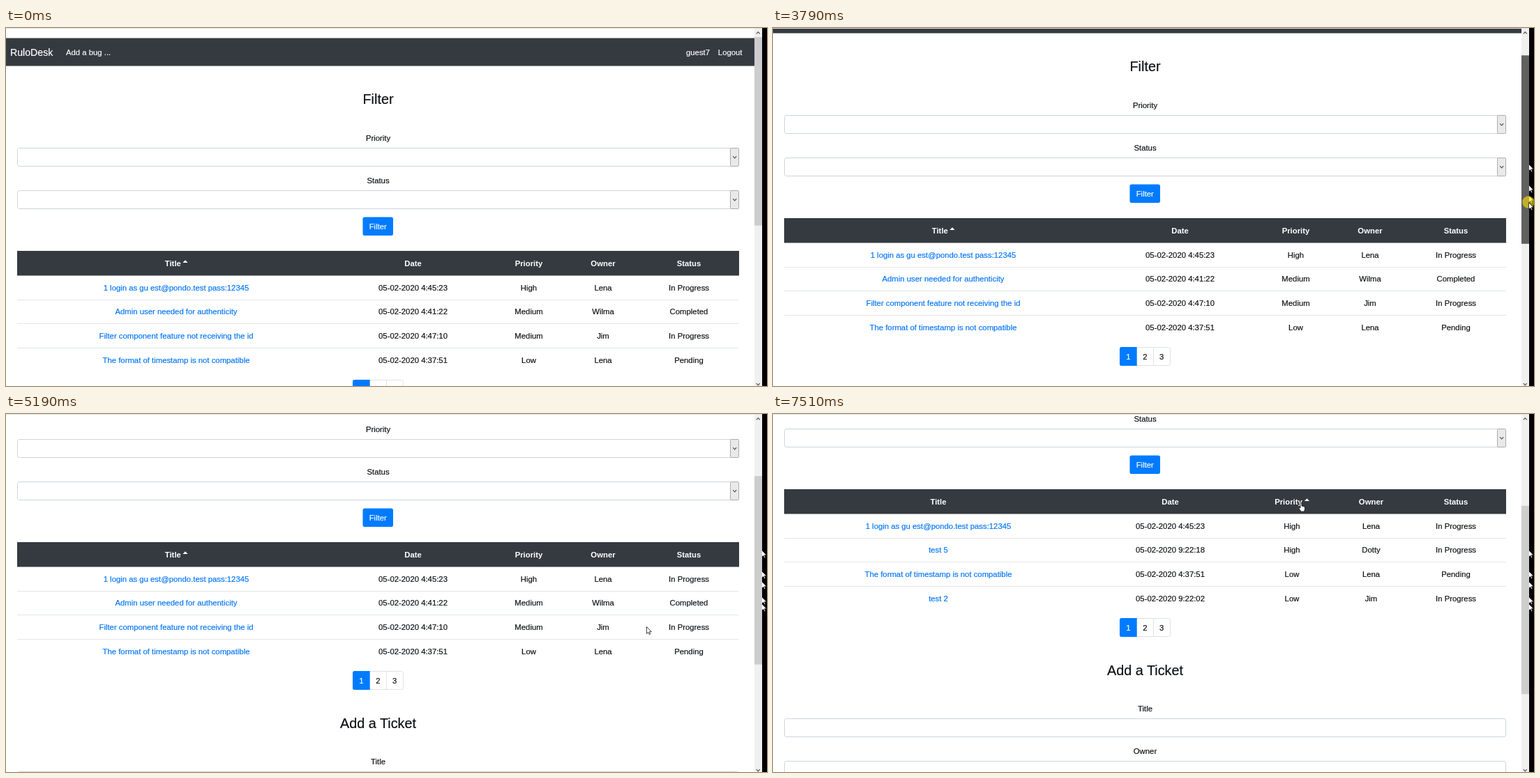
Recreate the animation shown at these times as an HTML page. Size 1091x514 px, loop 8000 ms.

```html
<!DOCTYPE html>
<html lang="en">
<head>
<meta charset="utf-8">
<title>Bug list</title>
<style>
  html, body { margin: 0; width: 100%; height: 100%; overflow: hidden; background: #fff; }
  svg { display: block; font: 11.34px "Liberation Sans", Arial, sans-serif; }
  text { color: #0d1013; fill: currentColor; stroke: currentColor; stroke-width: .18; }
  .mid { text-anchor: middle; }
  .end { text-anchor: end; }
  .big { font-size: 19.84px; }
  .brand { font-size: 14.17px; }
  .bold { font-weight: bold; stroke: none; }
  .white { color: #fff; }
  .link { color: #0074f5; }
  .chevron { fill: none; stroke: #505050; stroke-width: 1.2; }
  .pointer { fill: #fff; stroke: #111; stroke-width: .8; }
</style>
</head>
<body>
<svg id="stage" width="1091" height="514" viewBox="0 0 1091 514"></svg>
<script>
const LOOP = 8000, PRESS = 3590, RELEASE = 4420, LEAVE = 5140, CLICK = 7000, SORT = 7220;
const ARROW = 'M.4.4V10.4L2.7 8.3 4.2 11.6 5.7 11 4.3 7.7H7.4Z';
const HAND = 'M-1 8V1.3Q0-.4 1 1.3V5L4.6 6Q6 6.5 5.6 9L4.6 13H0L-3 8.6Q-2.6 6.8-1 8Z';

const rect = (x, y, w, h, fill, extra = '') =>
  `<rect x="${x}" y="${y}" width="${w}" height="${h}" fill="${fill}" ${extra}/>`;
const text = (x, y, str, cls = 'mid') => `<text x="${x}" y="${y}" class="${cls}">${str}</text>`;
const chevron = (x, y, d = 1) =>
  `<path class="chevron" d="M${x - 2.5} ${y - d * 1.3}l2.5 ${d * 2.6} 2.5 ${-d * 2.6}"/>`;
const field = y => rect(16.5, y + .5, 1034, 26, '#fff', 'rx="2.8" stroke="#ced4da"');
const select = y => field(y) +
  rect(1038.5, y + .5, 12, 26, '#e9e9e9', 'rx="1" stroke="#adadad"') + chevron(1044.7, y + 13.5);

function table(id, cols, sorted, caretX, headX, rows) {
  const heads = ['Title', 'Date', 'Priority', 'Owner', 'Status'];
  let out = rect(16, 320, 1035, 35.5, '#343a40');
  heads.forEach((h, i) => out += text(i === sorted ? headX : cols[i], 341.5, h, 'mid bold white'));
  out += `<path fill="#fff" d="M${caretX - 3.6} 337l3.6-3.7 3.6 3.7z"/>`;
  rows.forEach((row, r) => {
    const y = 376.5 + r * 34.7;
    if (r) out += rect(16, Math.round(y - 21.7), 1035, 1, '#e3e6ea');
    row.split('|').forEach((cell, i) => out += text(cols[i], y, cell, i ? 'mid' : 'mid link'));
  });
  return `<g id="${id}">${out}</g>`;
}

const login = '1 login as gu est@pondo.test pass:12345|05-02-2020 4:45:23|High|Lena|In Progress';
const stamp = 'The format of timestamp is not compatible|05-02-2020 4:37:51|Low|Lena|Pending';
const byTitle = table('byTitle', [244, 583.5, 749.5, 856, 979], 0, 257, 239.3, [
  login,
  'Admin user needed for authenticity|05-02-2020 4:41:22|Medium|Wilma|Completed',
  'Filter component feature not receiving the id|05-02-2020 4:47:10|Medium|Jim|In Progress',
  stamp
]);
const byPriority = table('byPriority', [237, 569.5, 744, 857.5, 979], 2, 765.5, 739, [
  login,
  'test 5|05-02-2020 9:22:18|High|Dotty|In Progress',
  stamp,
  'test 2|05-02-2020 9:22:02|Low|Jim|In Progress'
]);

const pager = rect(497.5, 505.5, 72, 26, '#fff', 'rx="2.8" stroke="#dee2e6"') +
  rect(545, 505.5, 1, 26, '#dee2e6') +
  '<path fill="#007bff" d="M521.7 505V532H499.8Q497 532 497 529.2V507.8Q497 505 499.8 505Z"/>' +
  [1, 2, 3].map(n => text(485.5 + n * 23.9, 522.5, n, n === 1 ? 'mid white' : 'mid')).join('');

const page = rect(0, 14.5, 1073, 40, '#343a40') +
  text(6, 39.7, 'RuloDesk', 'brand white') + text(86, 38.7, 'Add a bug ...', 'white') +
  text(1009, 38.7, 'guest7', 'end white') + text(1055.5, 38.7, 'Logout', 'end white') +
  text(533.5, 109, 'Filter', 'mid big') +
  text(533.5, 162, 'Priority') + select(172) +
  text(533.5, 223, 'Status') + select(233) +
  rect(511.5, 271.5, 43.5, 26.5, '#007bff', 'rx="2.8"') + text(533.3, 289.2, 'Filter', 'mid white') +
  byTitle + byPriority + pager +
  text(533.5, 586.5, 'Add a Ticket', 'mid big') +
  text(533.5, 639, 'Title') + field(649) +
  text(533.5, 700, 'Owner') + field(710);

const trail = [195, 225, 240, 262, 272];
const stage = document.getElementById('stage');
stage.innerHTML = rect(0, 0, 1091, 514, '#fff') +
  `<g id="page">${page}</g>` +
  rect(0, 0, 1084, 1, '#e2e2e2') + rect(1073, 1, 11, 513, '#f0f0f0') +
  chevron(1078.3, 7, -1) + chevron(1078.3, 511.5) +
  rect(1073, 13, 11, 270.5, '#cdcdcd', 'id="thumb"') + rect(1084, 0, 7, 514, '#000') +
  '<clipPath id="edge"><rect x="1084" y="0" width="7" height="514"/></clipPath>' +
  '<g clip-path="url(#edge)">' +
  trail.map(y => `<path class="pointer trail" d="${ARROW}" transform="translate(1083 ${y})"/>`).join('') + '</g>' +
  '<circle id="press" r="8.7" fill="#ffe600" fill-opacity=".6"/><path id="cursor" class="pointer"/>';

// Each move: start, end, number of steps, points to pass after the previous end
const cursorMoves = [
  [180, 181, 1, [[800, 391]]],
  [260, 261, 1, [[764, 369]]],
  [970, 1110, 3, [[721, 289]]],
  [1420, 1510, 2, [[719, 281]]],
  [1690, 2280, 9, [[586, 246], [690, 226], [880, 289]]],
  [2730, 3530, 11, [[1000, 225], [1083, 195], [1083, 197]]],
  [PRESS, 4310, 10, [[1083, 250], [1083, 272]]],
  [LEAVE, 5430, 5, [[624, 365]]],
  [6130, 6910, 11, [[583, 310], [874, 140], [800, 107], [757, 127]]]
];
const scrollMoves = [
  [PRESS, 4310, 10, [[79], [130]]],
  [RELEASE, 4720, 1, [[136]]],
  [5360, 5580, 4, [[171], [212]]]
];
const linear = u => u;
const easeOut = u => 1 - (1 - u) ** 2;

function pose(moves, t, from, ease) {
  for (const [start, end, steps, points] of moves) {
    if (t < start) break;
    const step = Math.floor((t - start) / (end - start) * (steps - 1) + .2);
    const path = [from, ...points];
    const u = ease(Math.min(1, (step + 1) / steps)) * points.length;
    const i = Math.min(points.length - 1, Math.floor(u));
    from = path[i].map((v, k) => v + (path[i + 1][k] - v) * (u - i));
  }
  return from.map(Math.round);
}

const el = id => document.getElementById(id);
const show = (node, on) => node.setAttribute('visibility', on ? 'visible' : 'hidden');
const set = (id, attrs) => { for (const k in attrs) el(id).setAttribute(k, attrs[k]); };
const trailMarks = [...document.querySelectorAll('.trail')];
const within = (t, from, to) => t >= from && t < to;

function draw(t) {
  const [x, y] = pose(cursorMoves, t, [-50, -50], easeOut);
  const [scroll] = pose(scrollMoves, t, [0], linear);
  const onHeader = t > 6130 && y > 108 && y < 144;
  const place = `translate(${x} ${y})`;

  set('page', { transform: `translate(0 ${-scroll})` });
  show(el('byTitle'), t < SORT);
  show(el('byPriority'), t >= SORT);
  set('thumb', {
    y: 13 + scroll * .56,
    fill: within(t, PRESS, LEAVE) ? '#606060' : x > 1072 ? '#a6a6a6' : '#cdcdcd'
  });
  set('cursor', { d: onHeader ? HAND : ARROW, transform: place });
  show(el('cursor'), !within(t, RELEASE, LEAVE));
  set('press', { transform: place });
  show(el('press'), within(t, PRESS, RELEASE) || within(t, CLICK, CLICK + 150));
  trailMarks.forEach((mark, i) => show(mark, t >= PRESS && (t >= RELEASE || trail[i] <= y)));
}

const begin = performance.now();
function frame() {
  draw((performance.now() - begin) % LOOP);
  requestAnimationFrame(frame);
}
frame();
</script>
</body>
</html>
```
